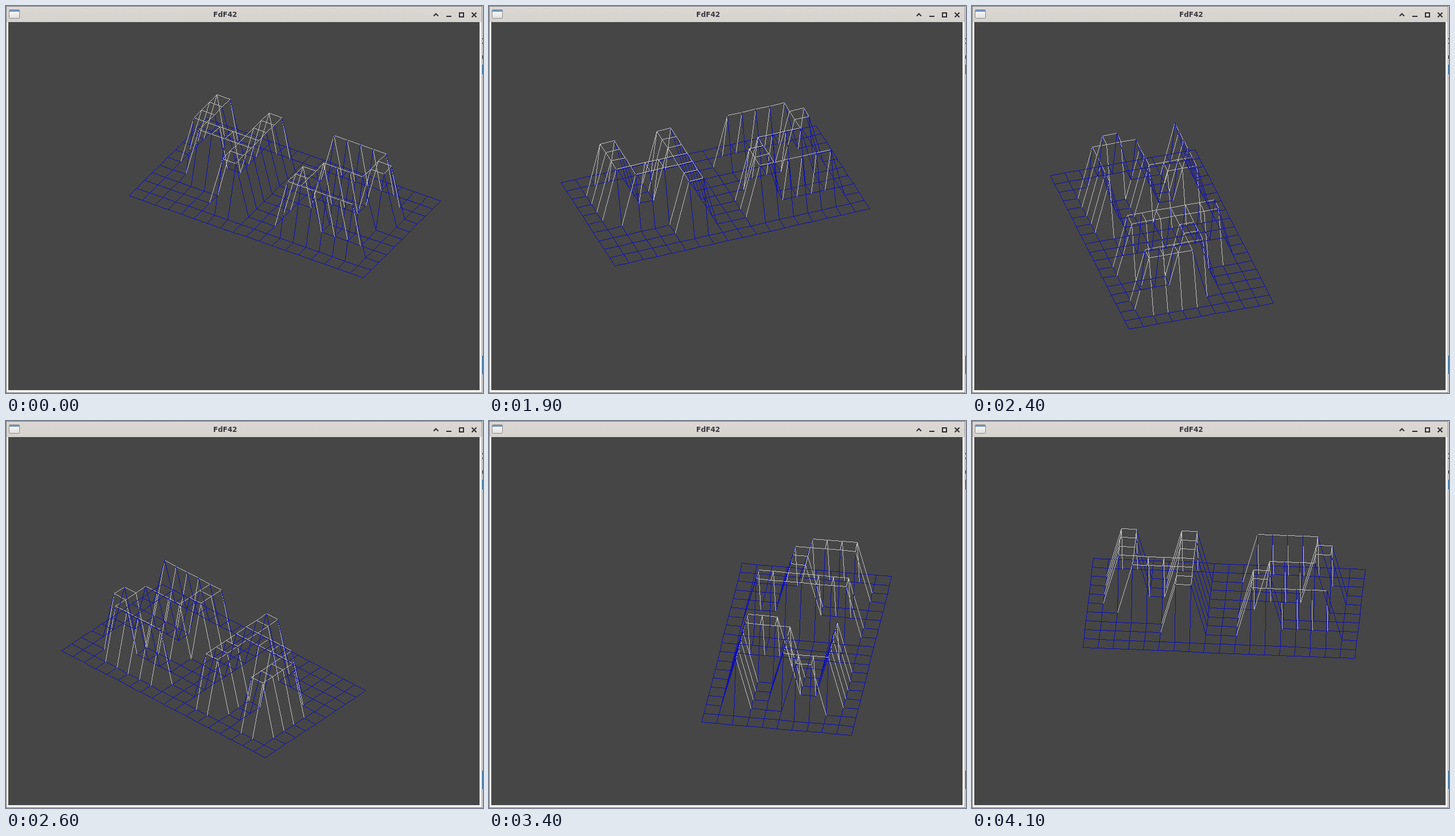
An HTML page with a canvas that plays this animation: 831 by 674 pixels, repeating every 4.2 s.

```html
<!DOCTYPE html>
<html lang="en">
<head>
<meta charset="utf-8">
<title>FdF42</title>
<style>
  html, body { margin: 0; width: 100%; height: 100%; overflow: hidden; background: #f6f5f4; }
  svg, canvas { position: absolute; left: 0; top: 0; }
  canvas { left: 4px; top: 28px; }
  text { font: bold 12px "DejaVu Sans", sans-serif; fill: #37373c; }
</style>
</head>
<body>
<svg width="831" height="674" viewBox="0 0 831 674">
  <defs>
    <linearGradient id="bar" x2="0" y2="1">
      <stop offset="0" stop-color="#dcd8d5"/><stop offset="1" stop-color="#d6d2ce"/>
    </linearGradient>
    <linearGradient id="pane" x2="0" y2="1">
      <stop offset="0" stop-color="#ffffff"/><stop offset="1" stop-color="#dedede"/>
    </linearGradient>
  </defs>
  <rect width="830" height="28" fill="url(#bar)"/>
  <path d="M0 .5H830M.5 0V674M829.5 0V674M0 673.5H830" stroke="#77777a"/>
  <rect x="830" width="1" height="674" fill="#fff"/>
  <path d="M830.5 102V119M830.5 609V641" stroke="#2c84cc"/>
  <path d="M830.5 56V58M830.5 64V66M830.5 86V92" stroke="#444"/>
  <rect x="5.5" y="6.5" width="18" height="15" rx="1" fill="url(#pane)" stroke="#8c8c8c"/>
  <rect x="6" y="7" width="17" height="3" fill="#6f94c4"/>
  <text x="361" y="19">FdF42</text>
  <g fill="none" stroke="#2d2d30" stroke-width="2">
    <path d="M745 17.5L749 13.5L753 17.5M767 18H776M790 12H797V19H790ZM811.5 11.5L819.5 19.5M819.5 11.5L811.5 19.5"/>
  </g>
</svg>
<canvas id="view" width="821" height="641"></canvas>
<script>
const MAP = [
  "...................",
  "...................",
  "..##..##...#####...",
  "..##..##.......##..",
  "..##..##.......##..",
  "..######....####...",
  "...#####...##......",
  "......##...##......",
  "......##...######..",
  "...................",
  "..................."
];
const LOOP = 4200, HOLD = 1700, TICK = 100;
const START = 0.5358, TURN = 0.05;      // radians
const SCALE = 26.38, TILT = 0.589, PEAK = 85.2;
const CX = 428, CY = 360.6, PIVOT = 9;

// Turns made in each tick after the hold; the key repeat stutters later on.
const TURNS = [6, 6, 6, 6, 6, 6, 6, 6, 6, 5, 0, 15, 0, 3, 6, 11, 4, 4, 3, 4, 5, 4, 6, 6, 5];

const ctx = document.getElementById("view").getContext("2d");
const isHigh = (col, row) => MAP[row][col] === "#";

function project(col, row, angle) {
  const x = (col - PIVOT) * SCALE, y = (row - PIVOT) * SCALE;
  const c = Math.cos(angle), s = Math.sin(angle);
  return [
    Math.floor(CX + x * c - y * s),
    Math.floor(CY + TILT * (x * s + y * c) - (isHigh(col, row) ? PEAK : 0))
  ];
}

// Bresenham line without smoothing
function line([x, y], [x1, y1]) {
  const dx = Math.abs(x1 - x), dy = -Math.abs(y1 - y);
  const sx = x < x1 ? 1 : -1, sy = y < y1 ? 1 : -1;
  let err = dx + dy;
  for (;;) {
    ctx.fillRect(x, y, 1, 1);
    if (x === x1 && y === y1) return;
    const e2 = 2 * err;
    if (e2 >= dy) { err += dy; x += sx; }
    if (e2 <= dx) { err += dx; y += sy; }
  }
}

function draw(angle) {
  ctx.fillStyle = "#464646";
  ctx.fillRect(0, 0, 821, 641);
  const edge = (from, col, row) => {
    if (row >= MAP.length || col >= MAP[0].length) return;
    ctx.fillStyle = isHigh(col, row) ? "#bebebe" : "#0f0fb4";
    line(from, project(col, row, angle));
  };
  for (let row = 0; row < MAP.length; row++) {
    for (let col = 0; col < MAP[0].length; col++) {
      const from = project(col, row, angle);
      edge(from, col + 1, row);
      edge(from, col, row + 1);
    }
  }
}

const begin = performance.now();
let shown = -1;

function frame(now) {
  const t = Math.max(0, now - begin) % LOOP;
  const ticks = t < HOLD ? 0 : Math.floor((t - HOLD) / TICK) + 1;
  if (ticks !== shown) {
    shown = ticks;
    const turns = TURNS.slice(0, ticks).reduce((a, b) => a + b, 0);
    draw(START - TURN * turns);
  }
  requestAnimationFrame(frame);
}
frame(begin);
</script>
</body>
</html>
```
